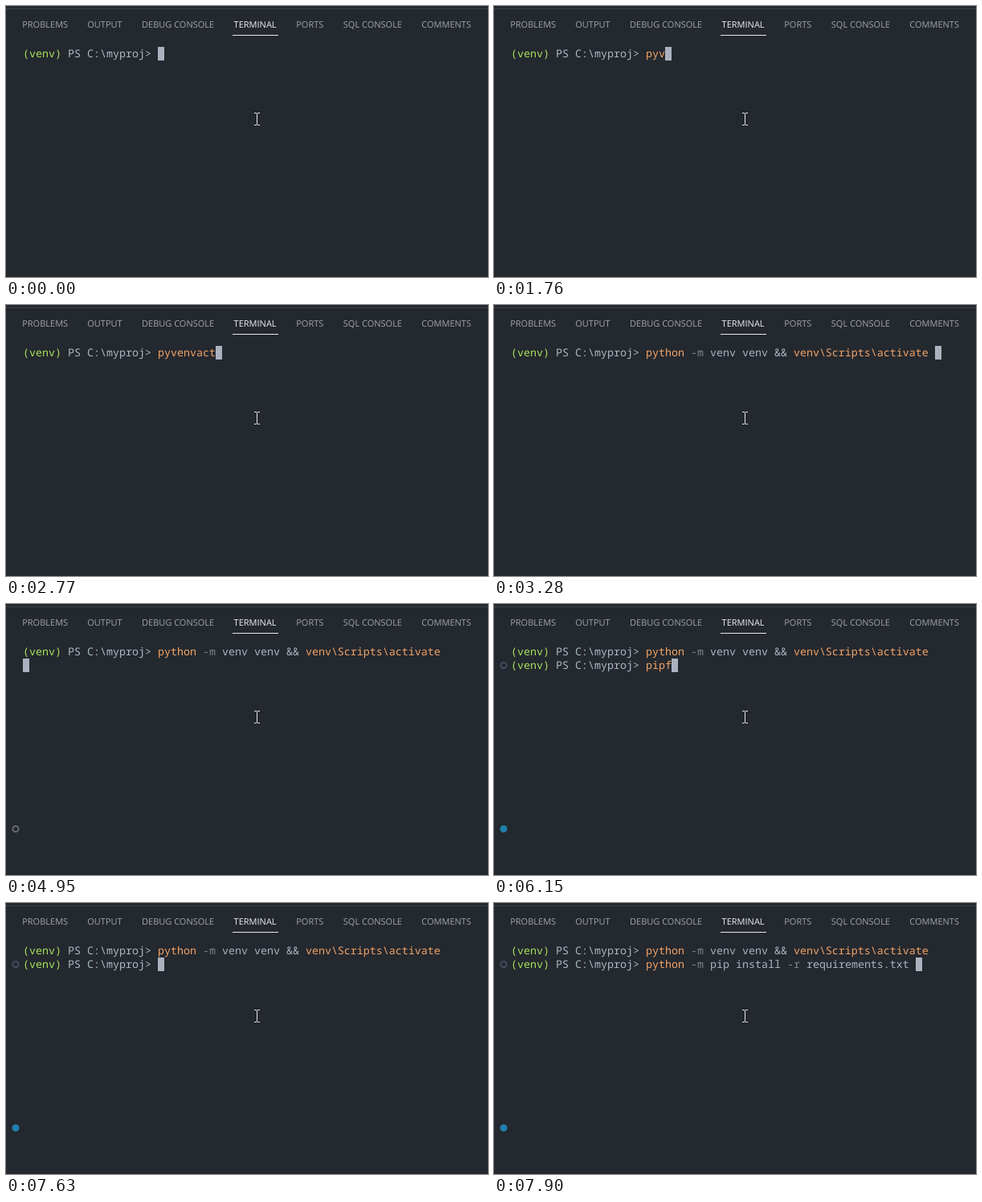
Recreate the animation shown at these times as an HTML page. Size 600 by 338 pixels, loop 8000 ms.

```html
<!DOCTYPE html>
<html lang="en">
<head>
<meta charset="utf-8">
<title>Terminal</title>
<style>
html, body { margin: 0; width: 100%; height: 100%; overflow: hidden; background: #24282f; }
svg { display: block; width: 600px; height: 338px; }
text { white-space: pre; text-rendering: geometricPrecision; }
#tabs text { font: 11px "Open Sans", "Noto Sans", sans-serif; fill: #a0a4aa; }
#tabs .active { fill: #f0f0f0; }
.line { font: 13.3333px "Noto Sans Mono", "DejaVu Sans Mono", monospace; fill: #abb2bf; }
</style>
</head>
<body>
<svg viewBox="0 0 600 338">
  <rect width="600" height="338" fill="#24282f"/>
  <rect y="3" width="600" height="1" fill="#3f444c"/>
  <g id="tabs">
    <text x="20.2" y="27">PROBLEMS</text>
    <text x="101.3" y="27">OUTPUT</text>
    <text x="169" y="27">DEBUG CONSOLE</text>
    <text x="283.6" y="27" class="active">TERMINAL</text>
    <text x="361.2" y="27">PORTS</text>
    <text x="419.8" y="27">SQL CONSOLE</text>
    <text x="517.3" y="27">COMMENTS</text>
  </g>
  <rect x="282" y="36" width="57" height="1" fill="#e7e7e7"/>
  <text class="line" x="21" y="64"></text>
  <text class="line" x="21" y="81"></text>
  <rect id="cursor" width="8" height="17" fill="#abb2bf"/>
  <circle id="ring" cx="12" cy="280.5" r="3.6" fill="none" stroke="#666a70" stroke-width="2"/>
  <circle id="dot" cx="12" cy="280.5" r="4.5" fill="#1f80ab"/>
  <circle id="mark" cx="12" cy="76.5" r="3.6" fill="none" stroke="#4b4e68" stroke-width="1.8"/>
  <path d="M309 133.5h3m1 0h3M312.5 134v14M309 148.5h3m1 0h3" fill="none" stroke="#e4e4e4"/>
</svg>
<script>
const LOOP = 8000, ENTER = 4950, READY = 5100, CELL = 8;
const PROMPT = "(venv) PS C:\\myproj> ";
const ORANGE = "#f2a366", GREEN = "#a5e05c", GREY = "#7f848e", PLAIN = "#abb2bf";
const PATH = "#a9bac2";

// Each command: a typed shortcut, then its expansion in quick steps.
const commands = [
  { short: "pyvenvact", keys: [1150, 1420, 1760, 1860, 2010, 2170, 2420, 2620, 2720],
    full: "python -m venv venv && venv\\Scripts\\activate ",
    grow: [3030, 3090, 3150, 3220, 3280] },
  { short: "pipfreqs", keys: [5660, 5760, 5850, 6150, 6400, 6460, 6920, 7380],
    full: "python -m pip install -r requirements.txt ",
    grow: [7630, 7680, 7740, 7790, 7850, 7900] }
];

const byId = id => document.getElementById(id);
const lines = document.querySelectorAll(".line");
const passed = (times, t) => times.filter(at => t >= at).length;
const show = (id, on) => byId(id).setAttribute("visibility", on ? "visible" : "hidden");

function typed({ short, keys, full, grow }, t) {
  const step = passed(grow, t);
  if (!step) return short.slice(0, passed(keys, t));
  return full.slice(0, Math.ceil(full.length * (step - 1) / (grow.length - 1)));
}

// Splits a command into words, colouring command names and flags.
function colourise(text) {
  let command = true;
  return (text.match(/\S+\s*/g) || []).map(word => {
    const colour = command ? ORANGE : word[0] === "-" ? GREY : PLAIN;
    command = word.startsWith("&&");
    return [word, colour];
  });
}

function write(line, text) {
  if (line.dataset.text === text) return;
  line.dataset.text = text;
  const parts = text
    ? [["(venv)", GREEN], [PROMPT.slice(6), PATH], ...colourise(text.slice(PROMPT.length))]
    : [];
  line.replaceChildren(...parts.map(([word, colour]) => {
    const span = document.createElementNS("http://www.w3.org/2000/svg", "tspan");
    span.textContent = word;
    span.setAttribute("fill", colour);
    return span;
  }));
}

function draw(t) {
  const texts = [PROMPT + typed(commands[0], t), t < READY ? "" : PROMPT + typed(commands[1], t)];
  texts.forEach((text, i) => write(lines[i], text));
  const row = t < ENTER ? 0 : 1;
  byId("cursor").setAttribute("x", 21 + CELL * texts[row].length);
  byId("cursor").setAttribute("y", 51 + 17 * row);
  show("ring", t >= ENTER && t < READY);
  show("dot", t >= READY);
  show("mark", t >= READY);
}

const start = performance.now();
function tick() {
  draw((performance.now() - start) % LOOP);
  requestAnimationFrame(tick);
}
tick();
</script>
</body>
</html>
```
